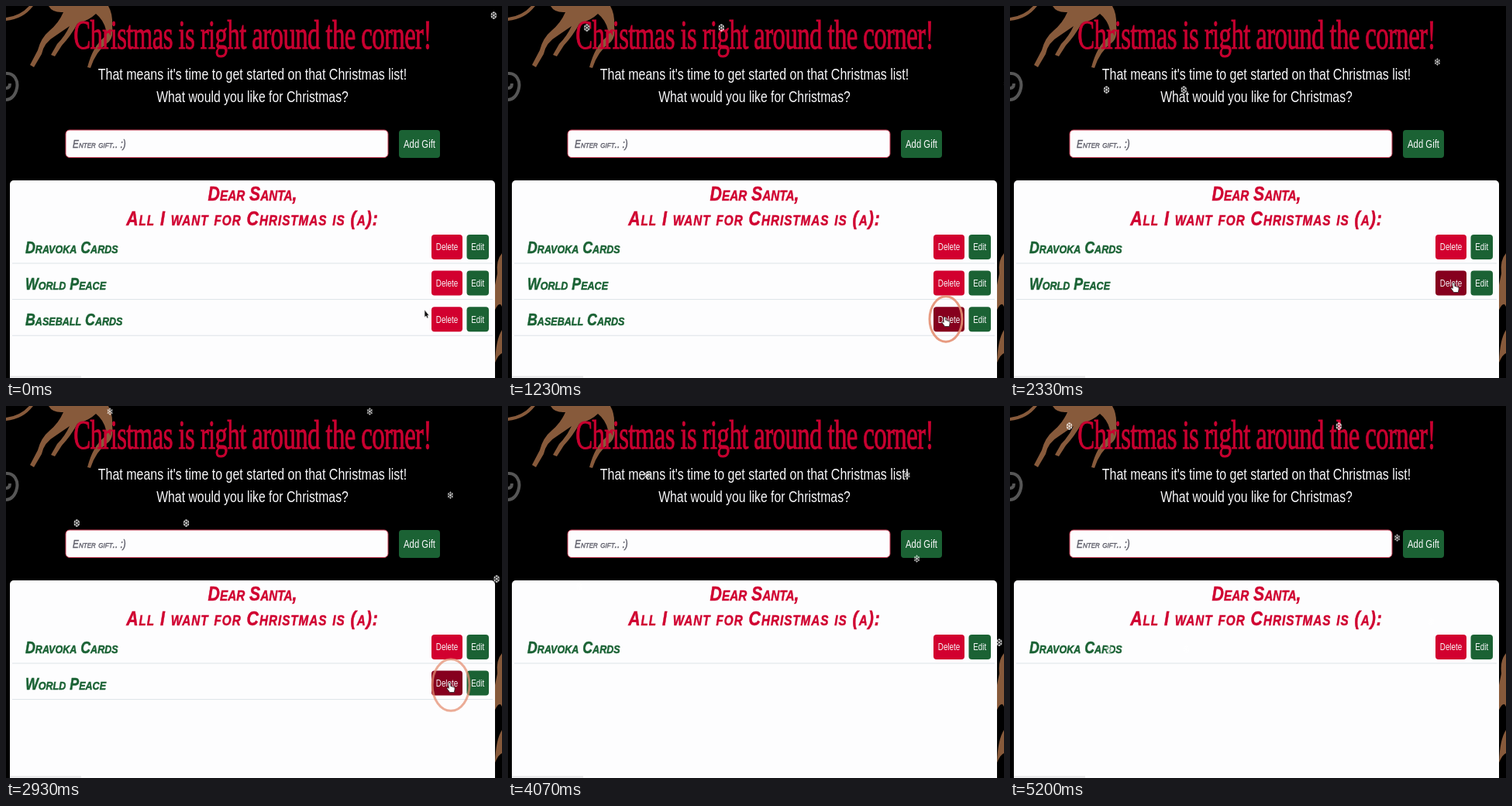
Write an HTML page that moves like this. It is 640 px wide and 480 px high and loops after 5.23 s.

```html
<!DOCTYPE html>
<html lang="en">
<head>
<meta charset="utf-8">
<title>Christmas list</title>
<style>
  html, body { margin: 0; height: 100%; overflow: hidden; background: #000; }
  svg { display: block; width: 100%; height: 100%; }
  text { font-family: "Liberation Sans", Arial, sans-serif; fill: #f8f8fa; white-space: pre; }
  .mid { text-anchor: middle; }
  .title { font-family: "Liberation Serif", serif; letter-spacing: -1px; fill: #c90030; stroke: #c90030; }
  .marker { font-style: italic; font-variant: small-caps; }
  .head, .gift { font-weight: bold; stroke-width: .5; }
  .head { fill: #d00030; stroke: #d00030; }
  .wide { letter-spacing: 1.2px; }
  .gift { fill: #1a6234; stroke: #1a6234; }
  .hint { fill: #5c5c68; stroke: #5c5c68; stroke-width: .4; }
  .flake { font-family: "DejaVu Sans", sans-serif; fill: #fff; opacity: .85; }
</style>
</head>
<body>
<svg id="stage" viewBox="0 0 640 480" preserveAspectRatio="none"></svg>
<script>
const LOOP = 5230;
const SQUASH = 0.82;   // the page is shown slightly narrowed
const GREEN = '#1b6234', RED = '#d2002f', DARK_RED = '#86001e';
const stage = document.getElementById('stage');

const text = (x, y, size, cls, str, squash = SQUASH) =>
  `<text class="${cls}" font-size="${size}" transform="translate(${x} ${y}) scale(${squash} 1)">${str}</text>`;

const button = (x, y, w, h, fill, size, label) =>
  `<rect x="${x}" y="${y}" width="${w}" height="${h}" rx="4" fill="${fill}"/>` +
  text(x + w / 2, y + h / 2 + size * 0.36, size, 'mid', label);

const gifts = ['Dravoka Cards', 'World Peace', 'Baseball Cards'];
const row = (name, i) => `<g class="row" transform="translate(0 ${i * 46.6})">
  ${text(25, 319, 21.7, 'marker gift', name)}
  ${button(549, 295, 40, 32, RED, 12, 'Delete')}
  ${button(594.5, 295, 28.5, 32, GREEN, 12, 'Edit')}
  <path d="M8 332H628" stroke="#dde3e8"/></g>`;

// left %, fall delay, sway delay, glyph
const flakes = [
  [80, 1, 0, '❆'], [25, 2, 0, '❆'], [40, 2, 2, '❆'], [70, 2.5, 1, '❄'],
  [30, 4, 2, '❄'], [65, 4, 2.5, '❄'], [20, 6, 0.5, '❆'], [60, 6, 2, '❆']
];

stage.innerHTML = `
  <rect width="640" height="480"/>
  <g fill="#875a3b">
    <path d="M0 15Q18 13 30 0H35Q22 17 0 19Z"/>
    <path d="M55 0Q60 9 74 8Q68 22 56 32Q45 41 41 57L31 76L36 79L46 62Q49 47 63 39L82 26
      Q76 39 66 49L58 63L63 65L72 51Q84 38 92 23Q108 18 116 10Q126 18 129 31L127 40Q112 52 105 79L109 80
      Q116 58 133 46Q139 40 137 25Q138 10 132 0Z"/>
    <path d="M640 319Q632 328 634 345L631 360V392Q637 380 640 388Z"/>
    <path d="M640 418Q632 430 631 460Q636 449 640 448Z"/>
  </g>
  <path d="M0 87C11 86 16 97 14 106C12 116 6 121 0 121M0 106Q5 106 5 100" fill="none" stroke="#565656" stroke-width="4"/>
  ${text(318, 55, 53, 'mid title', 'Christmas is right around the corner!', 0.62)}
  ${text(318, 95, 19.5, 'mid', "That means it's time to get started on that Christmas list!")}
  ${text(318, 124, 19.3, 'mid', 'What would you like for Christmas?')}
  <rect x="77" y="160" width="416" height="35.5" rx="5" fill="#fdfdfe" stroke="#c43a52"/>
  ${text(86, 183, 14.5, 'marker hint', 'Enter gift.. :)')}
  ${button(507, 160, 53, 36, GREEN, 13.8, 'Add Gift')}
  <rect x="5" y="225" width="626" height="270" rx="5" fill="#fdfdfe"/>
  <path d="M5 478.5H97" stroke="#e6e6e8" stroke-width="2"/>
  ${text(318, 251, 26, 'mid marker head', 'Dear Santa,')}
  ${text(318, 283, 26, 'mid marker head wide', 'All I want for Christmas is (a):')}
  ${gifts.map(row).join('')}
  ${flakes.map(f => text(0, 0, 13.4, 'mid flake', f[3])).join('')}
  <ellipse id="ring" fill="none" stroke="#e58f72" stroke-width="3"/>
  <g id="cursor">
    <path id="arrow" d="M0 0V9.5L2 8L3.5 11L5 10.3L3.8 7.3H6Z" fill="#111" stroke="#e8e8e8" stroke-width=".7"/>
    <path id="hand" d="M-.8 .8Q.6-.8 1.8 .8V4.5L6 5.6Q7.4 6 7.2 8L6.4 12.5H.6L-3 7.6Q-3 6-1.6 6.6L-.8 7.4Z"
      fill="#fff" stroke="#222" stroke-width=".8"/>
  </g>`;

const find = id => document.getElementById(id);
const rows = [...stage.querySelectorAll('.row')];
const flakeNodes = [...stage.querySelectorAll('.flake')];
const show = (node, on) => node.setAttribute('visibility', on ? 'visible' : 'hidden');
const clamp = v => Math.min(1, Math.max(0, v));

// cubic-bezier(.42, 0, .58, 1)
function ease(x) {
  let lo = 0, hi = 1, u = 0.5;
  for (let i = 0; i < 16; i++) {
    u = (lo + hi) / 2;
    const bx = 3 * u * (1 - u) * (0.42 * (1 - u) + 0.58 * u) + u ** 3;
    if (bx < x) lo = u; else hi = u;
  }
  return u * u * (3 - 2 * u);
}

function drawSnow(s) {
  flakes.forEach(([left, fall, sway], i) => {
    const phase = (s + 5.505 - sway) % 3 / 1.5;
    const x = -171 + 9.85 * left + 55 * ease(phase < 1 ? phase : 2 - phase);
    const y = 72 * (s + 1.166 - fall);
    flakeNodes[i].setAttribute('transform', `translate(${x} ${y + 4.9}) scale(${SQUASH} 1)`);
  });
}

function drawPointer(t) {
  const a = ease(clamp(t / 300)), b = ease(clamp((t - 1700) / 300));
  const x = 540 + 23 * a + 9 * b, y = 392 + 9 * a - 44 * b;
  const over = t < 3900 && x > 549;
  const hovered = !over ? -1 : y > 388 ? 2 : y < 374 ? 1 : -1;
  const gone = [Infinity, 3000, 1600];
  rows.forEach((node, i) => {
    node.style.display = t < gone[i] ? '' : 'none';
    node.querySelector('rect').setAttribute('fill', i === hovered ? DARK_RED : RED);
  });

  find('cursor').setAttribute('transform', `translate(${x} ${y})`);
  find('cursor').style.display = t < 3900 ? '' : 'none';
  show(find('arrow'), !over);
  show(find('hand'), over);

  const ring = find('ring');
  const k = (t - (t < 2000 ? 1090 : 2750)) / 250;
  show(ring, k > 0 && k < 1);
  if (k > 0 && k < 1) {
    const ry = 36 * (1 - (1 - k) ** 2);
    const attrs = { cx: x + 2, cy: y + 3, rx: ry * 0.72, ry, opacity: 1 - k ** 4 };
    for (const name in attrs) ring.setAttribute(name, attrs[name]);
  }
}

const start = performance.now();
function frame() {
  const t = (performance.now() - start) % LOOP;
  drawSnow(t / 1000);
  drawPointer(t);
  requestAnimationFrame(frame);
}
frame();
</script>
</body>
</html>
```
